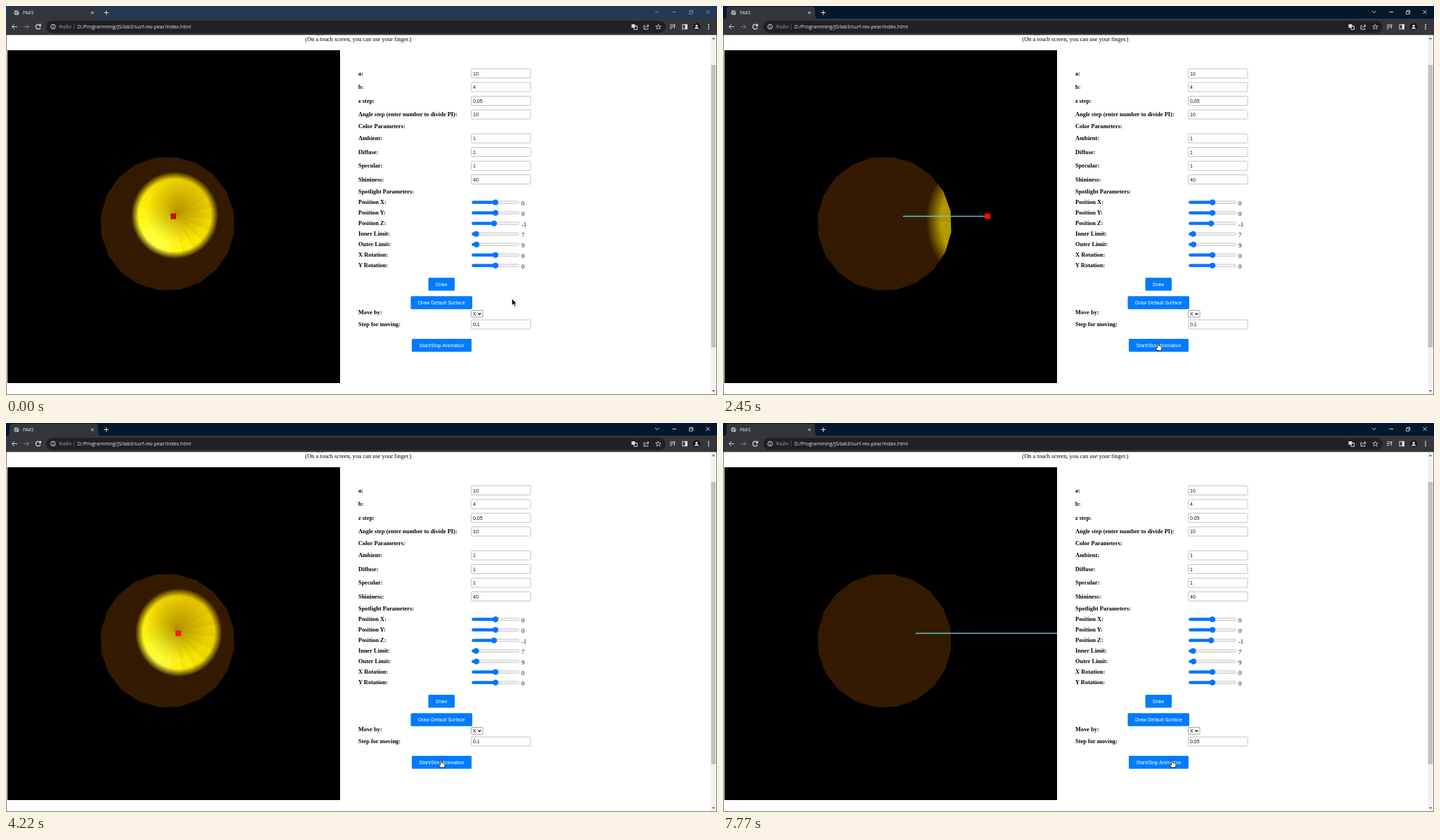
An HTML page with a canvas for the animation above (8 s loop, 1011 px wide and 554 px high).

```html
<!DOCTYPE html>
<html lang="en">
<head>
<meta charset="utf-8">
<title>PA#3</title>
<style>
html, body { margin: 0; width: 1011px; height: 554px; overflow: hidden; background: #fff; }
svg, canvas { position: absolute; left: 0; top: 0; }
canvas { left: 2px; top: 63px; }
.serif { font: 8.42px "Liberation Serif", serif; }
.bold { font-weight: bold; }
.sans { font: 7.02px "Liberation Sans", sans-serif; }
.ui { font: 7.03px "Open Sans", sans-serif; }
.mid { text-anchor: middle; }
.icon { fill: none; stroke: #d5d8dc; stroke-width: 1; }
</style>
</head>
<body>
<svg id="page" width="1011" height="554"></svg>
<canvas id="scene" width="473" height="474"></canvas>
<svg id="over" width="1011" height="554">
  <g id="arrow"><path d="M0 0V9.3L2.2 7.3L3.8 10.8L5.3 10.1L3.8 6.7H6.6Z" fill="#000" stroke="#fff" stroke-width=".5"/></g>
  <g id="hand"><path d="M-1 .5Q0-.6 1 .5V4Q2.2 3.4 2.8 4.5Q4 4 4.4 5.2Q5.6 5.1 5.6 6.4Q5.6 9 4.3 10.8H-.8Q-2 8.6-3.7 6.6Q-3.4 5.1-1 7Z" fill="#fff" stroke="#000" stroke-width=".8"/></g>
  <g id="beam"><path d="M-2-5.3H-.5L0-4.8L.5-5.3H2M0-4.8V4.8M-2 5.3H-.5L0 4.8L.5 5.3H2" fill="none" stroke="#000" stroke-width="1"/></g>
</svg>
<script>
const $ = id => document.getElementById(id);
const LOOP = 8000, TAU = Math.PI * 2;

// ---------- static page ----------
const text = (x, y, s, cls, fill = '#000', id = '') =>
  `<text x="${x}" y="${y}" class="${cls}" fill="${fill}" id="${id}">${s}</text>`;
const rect = (x, y, w, h, fill, more = '') =>
  `<rect x="${x}" y="${y}" width="${w}" height="${h}" fill="${fill}" ${more}/>`;
const icon = (d, more = '') => `<path class="icon" d="${d}" ${more}/>`;
const label = (y, s) => text(501, y + 2.6, s, 'serif bold');
const field = (y, value, id = '') =>
  rect(661.5, y - 6.5, 84.5, 13, '#fff', `rx="1.5" stroke="#c4c4c4" id="${id && id + 'Box'}"`) +
  text(664, y + 2.6, value, 'sans', '#111', id);
const slider = (y, x, value) =>
  rect(662.5, y - 1.8, 67, 3.8, '#efefef', 'rx="1.9" stroke="#b8b8b8" stroke-width=".6"') +
  rect(662.3, y - 2, x - 662.3, 4.2, '#0075ff', 'rx="2"') +
  `<circle cx="${x}" cy="${y + .1}" r="4.2" fill="#0075ff"/>` +
  text(733, y + 4.3, value, 'serif');
const button = (x, y, w, s) =>
  rect(x, y, w, 18.5, '#007bff', 'rx="1.5"') + text(x + w / 2, y + 11.7, s, 'sans mid', '#fff');

const inputs = [
  [96, 'a:', '10'], [115.5, 'b:', '4'], [135, 'z step:', '0,05'],
  [154.5, 'Angle step (enter number to divide PI):', '10'],
  [188.5, 'Ambient:', '1'], [208, 'Diffuse:', '1'], [227.5, 'Specular:', '1'], [247, 'Shininess:', '40']
];
const sliders = [
  ['Position X:', 696, '0'], ['Position Y:', 696, '0'], ['Position Z:', 694, '-1'],
  ['Inner Limit:', 668.5, '7'], ['Outer Limit:', 669, '9'],
  ['X Rotation:', 696, '0'], ['Y Rotation:', 696, '0']
];

$('page').innerHTML =
  text(501, 40.3, 'Drag your mouse on the model to rotate it.', 'serif mid') +
  text(501, 50, '(On a touch screen, you can use your finger.)', 'serif mid') +
  // browser frame
  rect(0, 0, 1011, 19, '#253a52', 'id="bar"') +
  '<path d="M1 18Q5 18 5 13V5Q5 1 9 1H127Q131 1 131 5V13Q131 18 135 18Z" fill="#35363a"/>' +
  rect(0, 18, 1011, 23, '#35363a') +
  rect(57, 21, 881, 17.5, '#202124', 'rx="8.7"') +
  '<circle cx="15" cy="9.5" r="3.6" fill="#b9bdc2"/>' +
  icon('M12 8.5L15 10L14 12.5M15.5 6.3L16 8.5L18 9', 'style="stroke:#35363a"') +
  text(24, 11.7, 'PA#3', 'ui', '#e8eaed').replace('class="ui"', 'class="ui" style="font-size:6.3px"') +
  icon('M121 7.8L124.6 11.4M124.6 7.8L121 11.4') +
  icon('M139.3 9.5H146M142.6 6.2V12.8') +
  icon('M16 29.5H8.5M12 26L8.5 29.5L12 33') +
  icon('M25 29.5H32.5M29 26L32.5 29.5L29 33', 'style="stroke:#7d8085"') +
  icon('M48.6 27.6A3.4 3.4 0 1 0 49 30.7M49.2 25.6V28.3H46.5', 'style="stroke-width:1.3"') +
  '<circle class="icon" cx="67" cy="29.5" r="3.3"/>' + icon('M67 29V31.5M67 27.4V28.2') +
  text(75, 32, 'Файл', 'ui', '#9aa0a6') + rect(96.5, 25.5, .8, 8, '#5f6368') +
  text(101.5, 32, 'D:/Programming/JS/lab3/surf-rev-pear/index.html', 'ui', '#e8eaed') +
  rect(889.5, 26, 5, 5, '#d5d8dc') + icon('M893 28.5H897.5V33.5H893Z') +
  icon('M909 28H907V33H913V31.5M909.5 31Q910 28 914 28M912 26L914 28L912 30') +
  icon('M927.5 26L928.5 28.6L931.2 28.7L929.1 30.4L929.9 33L927.5 31.5L925.1 33L925.9 30.4L923.8 28.7L926.5 28.6Z', 'style="stroke-width:.8"') +
  icon('M944 27H952M944 29.5H949M944 32H947M950.5 27V32') +
  rect(962, 26.3, 6.5, 6.5, 'none', 'class="icon"') + rect(965.5, 26.3, 3, 6.5, '#e8eaed') +
  '<circle cx="982" cy="29.5" r="5" fill="#111"/><circle cx="982" cy="28.2" r="1.6" fill="#e8eaed"/><path d="M979 32.4Q979 30.2 982 30.2T985 32.4Z" fill="#e8eaed"/>' +
  [26.5, 29.5, 32.5].map(y => `<circle cx="999" cy="${y}" r=".9" fill="#e8eaed"/>`).join('') +
  '<g id="winButtons">' + icon('M923 7L925.7 9.7L928.4 7') + icon('M947.5 8.5H953') +
  icon('M971.5 7.5H975.5V11.5H971.5ZM972.8 7.5V6.2H976.8V10.2H975.5', 'style="stroke-width:.8"') +
  icon('M995.5 6L1000.5 11M1000.5 6L995.5 11') + '</g>' +
  // scrollbar and window edge
  rect(1002, 41, 8, 512, '#f1f1f1') + rect(1002.7, 84, 6.6, 402, '#c1c1c1') +
  '<path d="M1004 47.2H1008L1006 44.8ZM1004 547.3H1008L1006 549.7Z" fill="#505050"/>' +
  rect(.3, 41, 1010.4, 512.5, 'none', 'stroke="#3b3f45" stroke-width=".7"') +
  // form
  inputs.map(([y, s, v]) => label(y, s) + field(y, v)).join('') +
  label(171.5, 'Color Parameters:') + label(264.5, 'Spotlight Parameters:') +
  sliders.map(([s, x, v], i) => label(279.5 + 15 * i, s) + slider(279.5 + 15 * i, x, v)).join('') +
  button(600.5, 387, 37.5, 'Draw') + button(575.5, 413.3, 87.5, 'Draw Default Surface') +
  label(436.5, 'Move by:') +
  rect(661.5, 433.5, 16.5, 9.7, '#fff', 'rx="1.3" stroke="#767676" stroke-width=".7"') +
  text(664, 441, 'X', 'sans') + icon('M671.3 437.3L673.3 439.4L675.3 437.3', 'style="stroke:#000;stroke-width:1.2"') +
  label(453.5, 'Step for moving:') + field(453.5, '0,1', 'step') +
  '<g id="focus">' + rect(670, 449, .7, 9, '#000', 'id="caret"') +
  '<path d="M737 452.8L739.3 450L741.6 452.8ZM737 454.4L739.3 457.2L741.6 454.4Z" fill="#555"/></g>' +
  button(577, 474, 85, 'Start/Stop Animation');

// ---------- scene ----------
const ctx = $('scene').getContext('2d');
const glowCanvas = document.createElement('canvas');
glowCanvas.width = 473;
glowCanvas.height = 474;
const glow = glowCanvas.getContext('2d');
ctx.translate(-2, -63);
glow.translate(-2, -63);

const body = new Path2D();
for (let i = 0; i < 20; i++) {
  const a = (i + .4) * TAU / 20;
  body.lineTo(229.6 + 95.6 * Math.cos(a), 310 + 95.6 * Math.sin(a));
}
body.closePath();

function radial(c, x, y, r, inner, outer, from = 0) {
  const g = c.createRadialGradient(x, y, 0, x, y, r);
  g.addColorStop(from, inner);
  g.addColorStop(1, outer);
  return g;
}

// slightly faceted yellow, brightest at the lower left
const facets = glow.createConicGradient(.12, 240, 298);
const shade = b => `rgb(${Math.min(255, 245 + 16 * b)},${Math.min(255, 226 + 27 * b)},${Math.max(0, 25 * b)})`;
for (let i = 0; i < 20; i++) {
  const b = Math.cos((i + .5) * TAU / 20 + .12 - TAU * 3 / 8);
  facets.addColorStop(i / 20, shade(b + .16));
  facets.addColorStop((i + 1) / 20, shade(b - .16));
}
const layers = [
  facets,
  radial(glow, 243, 294, 44, 'rgba(150,110,0,.6)', 'rgba(150,110,0,0)'),
  radial(glow, 207, 343, 42, 'rgba(255,255,120,.55)', 'rgba(255,255,120,0)')
];

// horizontal offset of the lamp
function lampOffset(t) {
  if (t < 1025) return 0;
  if (t < 4213) return 434 * Math.sin(TAU * (t - 1025) / 3180);
  if (t < 6180) return 7;
  return Math.max(7, 306 * Math.sin(Math.min((t - 6172) / 1000, TAU / 4)));
}

function drawScene(t) {
  const u = lampOffset(t), far = Math.abs(u);
  ctx.fillStyle = '#000';
  ctx.fillRect(2, 63, 473, 474);
  ctx.fillStyle = '#331a00';
  ctx.fill(body);

  if (far < 230) {
    glow.globalCompositeOperation = 'source-over';
    for (const layer of layers) {
      glow.fillStyle = layer;
      glow.fillRect(2, 63, 473, 474);
    }
    glow.save();
    glow.globalCompositeOperation = 'destination-in';
    glow.translate(240 + .8 * u, 298 + .05 * u);
    glow.scale(1, 1 + .0025 * far);
    glow.fillStyle = radial(glow, 0, 0, 62, '#000', 'transparent', .83 - .0012 * far);
    glow.fillRect(-900, -900, 1800, 1800);
    glow.restore();
    ctx.save();
    ctx.clip(body);
    ctx.globalAlpha = 1 - .0022 * far;
    ctx.drawImage(glowCanvas, 2, 63);
    ctx.restore();
  }

  const x = 238 + u;
  if (far > 8) {
    ctx.strokeStyle = '#66c4cc';
    ctx.lineWidth = 1.3;
    ctx.beginPath();
    ctx.moveTo(241 + .108 * u, 299.5);
    ctx.lineTo(x, 299.5);
    ctx.stroke();
  }
  ctx.fillStyle = t < 1025 ? '#bd1005' : far < 8 ? '#ee2410' : '#ff0800';
  ctx.fillRect(x - 4, 295.5, 8, 8);
}

// ---------- pointer and form state ----------
// time, x, y
const path = [
  [0, 719.5, 417], [230, 719.5, 417], [1000, 618.5, 480], [4230, 618.5, 480],
  [4560, 736, 452.5], [4660, 736, 452.5], [4970, 696, 452.5], [5990, 696, 452.5],
  [6170, 638.5, 480], [LOOP, 638.5, 480]
];
function pointer(t) {
  const i = path.findIndex(p => p[0] > t);
  const [t0, x0, y0] = path[i - 1], [t1, x1, y1] = path[i];
  const k = (t - t0) / (t1 - t0), e = k * k * (3 - 2 * k);
  return [x0 + (x1 - x0) * e, y0 + (y1 - y0) * e];
}

function drawForm(t) {
  const active = t >= 70, focused = t >= 4700 && t < 6170;
  $('bar').setAttribute('fill', active ? '#04182d' : '#253a52');
  $('winButtons').setAttribute('opacity', active ? 1 : .5);

  const value = t < 5370 ? '0,1' : t < 5440 ? '0,' : t < 5640 ? '0,0' : '0,05';
  $('step').textContent = value;
  $('stepBox').setAttribute('stroke', focused ? '#101010' : '#c4c4c4');
  $('stepBox').setAttribute('stroke-width', focused ? 1.6 : 1);
  $('focus').setAttribute('visibility', focused ? 'visible' : 'hidden');
  $('caret').setAttribute('x', 664.4 + $('step').getComputedTextLength());

  const [x, y] = pointer(t);
  const within = (l, top, r, b) => x > l && x < r && y > top && y < b;
  const kind = within(577, 474, 662, 492.5) || within(575.5, 413, 663, 432) ? 'hand'
    : within(661, 447, 746, 460) && t > 4000 ? 'beam' : 'arrow';
  for (const id of ['arrow', 'hand', 'beam']) {
    $(id).setAttribute('visibility', id === kind ? 'visible' : 'hidden');
    $(id).setAttribute('transform', `translate(${x} ${y})`);
  }
}

function frame() {
  const t = performance.now() % LOOP;
  drawScene(t);
  drawForm(t);
  requestAnimationFrame(frame);
}
frame();
</script>
</body>
</html>
```
